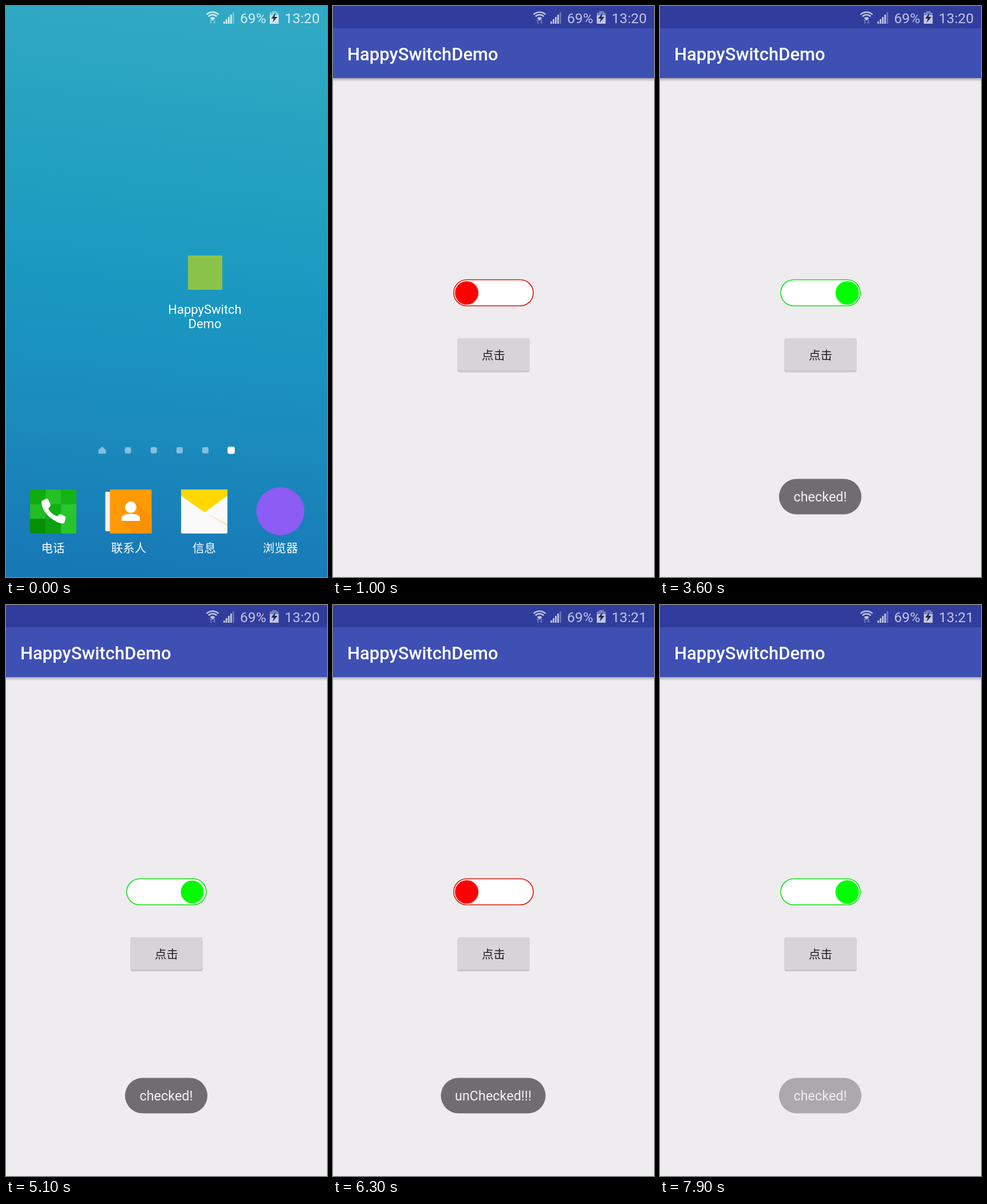
Animation of 561x998 px, one loop 8 s. Source, as an HTML page:

```html
<!DOCTYPE html>
<html lang="zh">
<head>
<meta charset="utf-8">
<title>Toggle switch</title>
<style>
  html, body { margin: 0; width: 100%; height: 100%; overflow: hidden; }
  svg { display: block; width: 100%; height: 100%; }
  text { font-family: Roboto, "Noto Sans CJK SC", "Noto Sans CJK", sans-serif; }
  .mid { text-anchor: middle; }
  .label { fill: #fff; font-size: 22px; }
  .cjk { font-family: "Noto Sans CJK SC", "Noto Sans CJK", sans-serif; font-size: 20.5px; }
  .status text { font-size: 24.6px; }
</style>
</head>
<body>
<svg viewBox="0 0 561 998" preserveAspectRatio="none">
  <defs>
    <linearGradient id="sky" x1=".53" y1="0" x2=".47" y2="1">
      <stop offset="0" stop-color="#31a9c4"/>
      <stop offset=".3" stop-color="#22a0c0"/>
      <stop offset=".52" stop-color="#1a97c1"/>
      <stop offset=".76" stop-color="#1b8abc"/>
      <stop offset="1" stop-color="#1778b6"/>
    </linearGradient>
    <linearGradient id="shade" x1="0" y1="0" x2="0" y2="1">
      <stop offset="0" stop-color="#000" stop-opacity=".28"/>
      <stop offset="1" stop-color="#000" stop-opacity="0"/>
    </linearGradient>
  </defs>

  <rect width="561" height="998" fill="url(#sky)"/>

  <g id="home">
    <rect x="318" y="436" width="60" height="60" fill="#8bc34a"/>
    <text class="label mid" x="347.5" y="538">HappySwitch</text>
    <text class="label mid" x="347.5" y="563">Demo</text>

    <g id="dots" fill="#84c0dc">
      <path d="M161.500 776 168 770 174.500 776V782.500H161.500Z"/>
    </g>

    <g id="tiles"></g>
    <path d="M62 867Q62 865 64 864L71 861Q73 861 74 863L78 872Q78 874 74 878C77 885 83 890 90 892Q93 888 95 888L103 892Q105 893 104 896L102 903C100 906 92 904 84 899C72 892 62 879 62 867Z" fill="#fff"/>

    <rect x="173.500" y="849" width="14" height="69" rx="2" fill="#f4f2f4"/>
    <rect x="181.500" y="845" width="73" height="77" rx="2" fill="#ff9a05"/>
    <path d="M226 868 254.500 893V922H222L203 900H234V890Z" fill="#f79105"/>
    <circle cx="218" cy="876" r="10" fill="#fff"/>
    <path d="M202 900V895C202 885 234 885 234 895V900Z" fill="#fff"/>

    <rect x="306" y="845" width="81" height="77" rx="2" fill="#fbfafb"/>
    <path d="M347 885 387 905V909Z" fill="#f8e6b4"/>
    <path d="M306 845H387V856L347 885 306 856Z" fill="#ffd802"/>

    <circle cx="479.500" cy="883" r="42" fill="#8c5cf4"/>

    <g class="mid" fill="#fff">
      <text class="cjk" x="82" y="954.500">电话</text>
      <text class="cjk" x="214.500" y="954.500">联系人</text>
      <text class="cjk" x="346.500" y="954.500">信息</text>
      <text class="cjk" x="479.500" y="954.500">浏览器</text>
    </g>
  </g>

  <g id="app">
    <rect width="561" height="998" fill="#eeecee"/>
    <rect width="561" height="39" fill="#303d9d"/>
    <rect id="edge" y="39" width="561" height="1.500" fill="#fff"/>
    <g id="content">
      <rect y="126" width="561" height="6.500" fill="url(#shade)"/>
      <rect y="39" width="561" height="87" fill="#3e50b4"/>
      <text x="25" y="95" fill="#fff" font-size="31" font-weight="500">HappySwitchDemo</text>

      <rect id="track" x="211" y="478.500" width="139" height="45.500" rx="22.750" fill="#fff" stroke-width="1.600"/>
      <circle id="knob" cy="501.500"/>

      <rect x="217.500" y="583" width="126" height="58" rx="4" fill="#000" opacity=".06"/>
      <rect x="217.500" y="582" width="126" height="57.500" rx="3" fill="#000" opacity=".14"/>
      <rect x="217.500" y="580.500" width="126" height="57" rx="3" fill="#d6d4d7"/>
      <text class="cjk mid" x="280.500" y="617.500" fill="#1d1c1e" font-weight="500">点击</text>

      <g id="toast">
        <rect id="pill" y="826.500" height="62" rx="31" fill="#6f6d6f"/>
        <text id="message" class="mid" x="280" y="865.500" fill="#f3f2f3" font-size="23.400"></text>
      </g>
    </g>
  </g>

  <g id="status" class="status" fill="#fff">
    <g fill="none" stroke="#fff" stroke-width="2.400">
      <path d="M350.500 15A15 15 0 0 1 371.500 15"/>
      <path d="M353.800 18.300A10.200 10.200 0 0 1 368.200 18.300"/>
    </g>
    <path d="M356.500 21A6.400 6.400 0 0 1 365.500 21L361 25.500Z"/>
    <path d="M358 23 361 26H359V31H357V26H355ZM364 31 361 28H363V23H365V28H367Z" opacity=".4"/>
    <g id="bars"></g>
    <text x="409" y="29.500">69%</text>
    <path d="M465 9H473V11.500H476.500V17H461V11.500H465Z" opacity=".5"/>
    <path d="M461 16H476.500V31H461Z"/>
    <path d="M471 12 463.500 22H468L466 29 474.500 19H469.500Z" fill="#15203c"/>
    <text id="clock" x="487" y="29.500"></text>
  </g>
</svg>

<script>
const LOOP = 8000, STEP = 100;
const $ = id => document.getElementById(id);
const set = (id, attrs) => {
  for (const name in attrs) $(id).setAttribute(name, attrs[name]);
};
const addRect = (parent, attrs) => {
  const rect = document.createElementNS($(parent).namespaceURI, 'rect');
  for (const name in attrs) rect.setAttribute(name, attrs[name]);
  $(parent).append(rect);
};

for (let i = 1; i < 6; i++) {
  const last = i === 5, size = last ? 12.5 : 11;
  addRect('dots', { x: 168 + 45.1 * i - size / 2, y: 776.5 - size / 2, width: size, height: size,
    rx: 3, fill: last ? '#fff' : '#84c0dc' });
}
const greens = ['#0fac12', '#25c028', '#14b416', '#22bc25', '#12b014', '#28c62b', '#068f08', '#0da00f', '#28c42b'];
greens.forEach((fill, i) => addRect('tiles', {
  x: 42 + i % 3 * 27, y: 845 + Math.floor(i / 3) * 25.6, width: 27, height: 25.8, fill }));
for (let i = 0; i < 5; i++) {
  const height = 4 + i * 4;
  addRect('bars', { x: 380 + i * 4, y: 31 - height, width: 2.8, height, opacity: i > 3 ? .4 : 1 });
}

// Piecewise linear lookup in rows of [time, value].
const along = (rows, t) => {
  const next = rows.findIndex(row => row[0] > t);
  if (next === 0) return rows[0][1];
  if (next < 0) return rows[rows.length - 1][1];
  const [t0, a] = rows[next - 1], [t1, b] = rows[next];
  return a + (b - a) * (t - t0) / (t1 - t0);
};
const ease = (t, start) => {
  const p = Math.min(1, Math.max(0, (t - start) / 500));
  return (1 - Math.cos(Math.PI * p)) / 2;
};
const mix = (a, b, p) => `rgb(${a.map((v, i) => Math.round(v + (b[i] - v) * p))})`;

const homeFade = [[400, 1], [500, .8], [600, .3], [700, 0]];
const appFade = [[500, 0], [600, .5], [700, .93], [800, 1]];
const appRise = [[500, 80], [600, 79], [700, 70], [800, 24], [900, 4], [1000, 0]];
const toastFade = [[3050, 0], [3550, 1], [5130, 1], [5530, 0], [5750, 0], [6250, 1], [7710, 1], [8110, 0]];

function draw(t) {
  set('home', { opacity: along(homeFade, t) });
  set('app', { opacity: along(appFade, t), transform: `translate(0 ${along(appRise, t)})` });
  set('content', { opacity: t < 900 ? 0 : 1 });
  set('edge', { opacity: t < 900 ? .8 : 0 });
  set('status', { opacity: t < 900 ? .8 : .7 });
  $('clock').textContent = t < 6000 ? '13:20' : '13:21';

  const on = ease(t, 2560) - ease(t, 5057) + ease(t, 7160);
  set('knob', {
    cx: 233.7 + 93.4 * on,
    r: 20.5 * (1 - .5 * Math.sin(Math.PI * on)),
    fill: mix([255, 0, 0], [0, 255, 0], on)
  });
  set('track', { stroke: mix([218, 20, 4], [12, 228, 16], on) });

  const checked = t < 5560 || t >= 7660;
  const width = checked ? 144 : 183;
  set('pill', { x: 280 - width / 2, width });
  $('message').textContent = checked ? 'checked!' : 'unChecked!!!';
  set('toast', { opacity: along(toastFade, t) });
}

const begin = performance.now();
function tick() {
  const t = (performance.now() - begin) % LOOP;
  draw(Math.floor(t / STEP) * STEP);
  requestAnimationFrame(tick);
}
tick();
</script>
</body>
</html>
```
